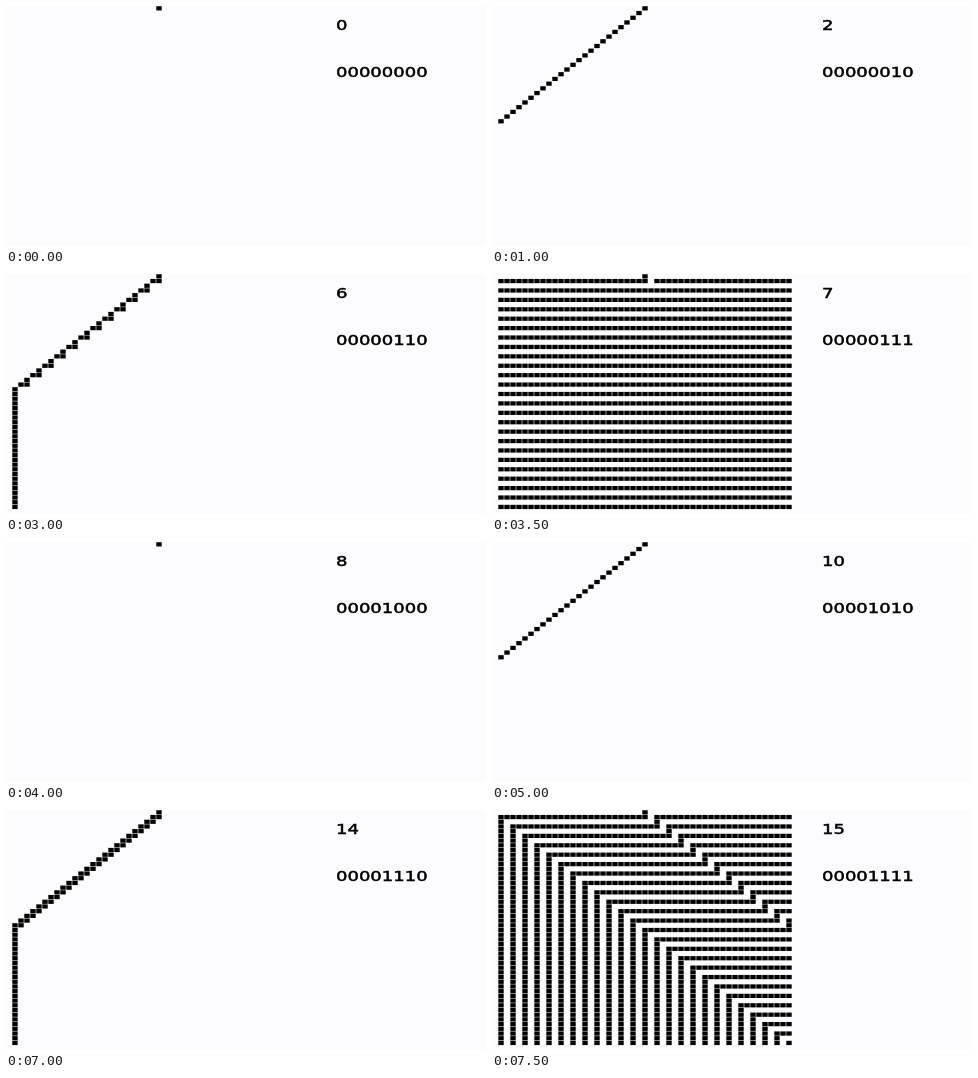
An HTML page with a canvas for the animation above (8000 ms loop, 480 px wide and 240 px high).

```html
<!DOCTYPE html>
<html lang="en">
<head>
<meta charset="utf-8">
<title>Elementary cellular automata</title>
<style>
html, body { margin: 0; width: 100%; height: 100%; overflow: hidden; background: #fcfcfe; }
canvas { display: block; }
</style>
</head>
<body>
<canvas id="stage" width="480" height="240"></canvas>
<script>
const ctx = document.getElementById('stage').getContext('2d');
const VIEW_W = 800, VIEW_H = 510;
const COLS = 49, ROWS = 50, CELL = 10;
const RULES = 16, STEP = 500;

// Cells beyond both edges count as 0.
function nextRow(row, rule) {
  return row.map((c, i) => {
    const left = row[i - 1] || 0, right = row[i + 1] || 0;
    return rule >> (left * 4 + c * 2 + right) & 1;
  });
}

function label(text, y) {
  ctx.fillText(text, 550, y);
  ctx.strokeText(text, 550, y);
}

function draw(rule) {
  ctx.setTransform(1, 0, 0, 1, 0, 0);
  ctx.fillStyle = '#fcfcfe';
  ctx.fillRect(0, 0, 480, 240);
  ctx.scale(480 / VIEW_W, 240 / VIEW_H);

  ctx.fillStyle = ctx.strokeStyle = '#000';
  let row = Array.from({ length: COLS }, (_, i) => +(i === COLS >> 1));
  for (let r = 0; r < ROWS; r++) {
    row.forEach((on, c) => {
      if (on) ctx.fillRect((c + 1) * CELL + 0.5, r * CELL + 0.5, CELL - 1, CELL - 1);
    });
    row = nextRow(row, rule);
  }

  ctx.font = '30px "DejaVu Sans", Verdana, sans-serif';
  ctx.lineWidth = 1;
  label(String(rule), 50);
  label(rule.toString(2).padStart(8, '0'), 150);
}

let shown = -1;
const start = performance.now();
function frame() {
  const rule = Math.floor((performance.now() - start) / STEP) % RULES;
  if (rule !== shown) draw(shown = rule);
  requestAnimationFrame(frame);
}
frame();
</script>
</body>
</html>
```
